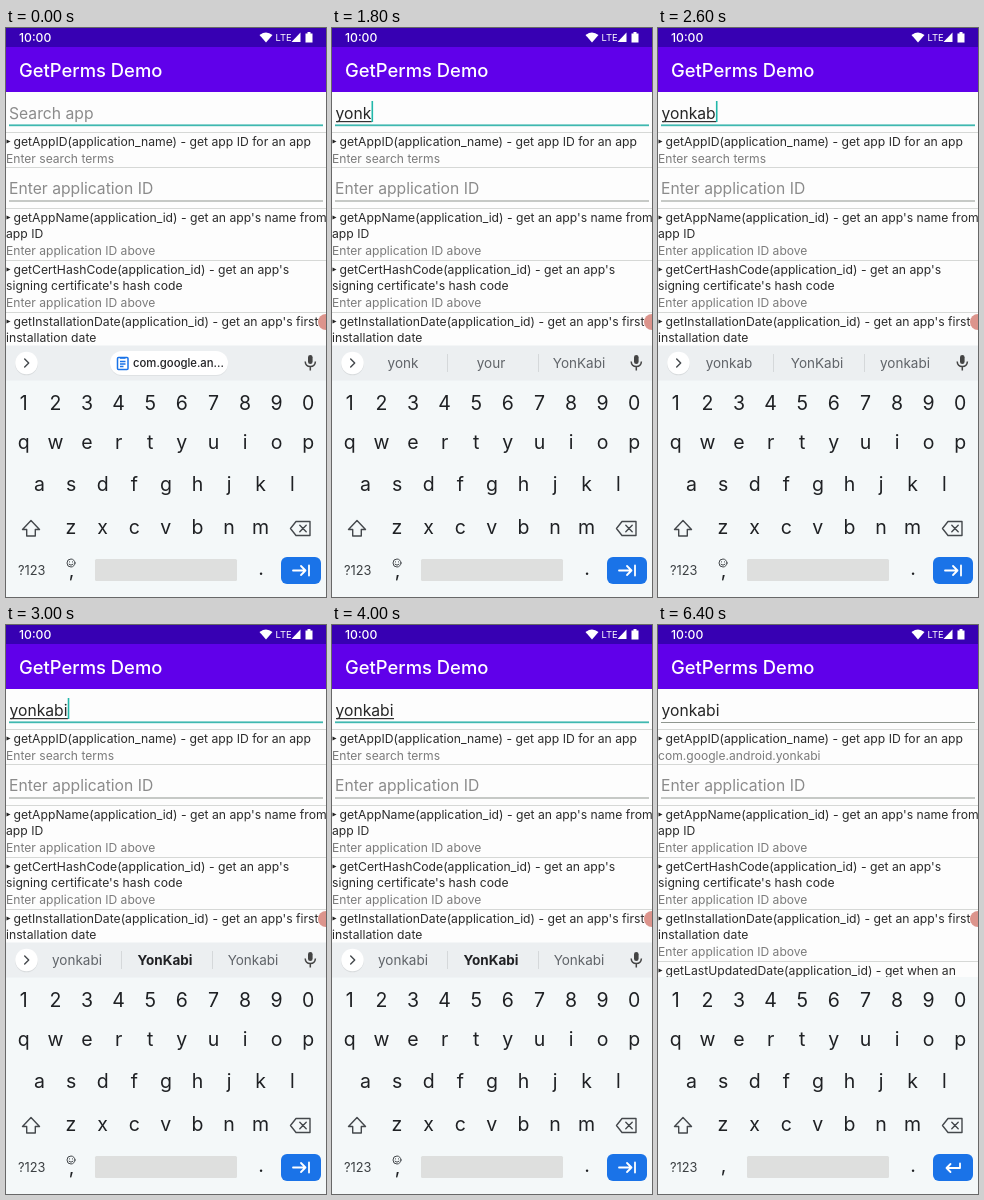
An HTML page that plays this animation: 320x569 px, repeating every 8000 ms.

```html
<!DOCTYPE html>
<html lang="en">
<head>
<meta charset="utf-8">
<title>GetPerms Demo</title>
<style>
  html, body { margin: 0; width: 100%; height: 100%; overflow: hidden; background: #fdfdfd; }
  svg { display: block; width: 320px; height: 569px; }
  text { font-family: Inter, Roboto, sans-serif; white-space: pre; }
  .title { font-size: 12.2px; fill: #2b2b2b; }
  .sub { font-size: 12.1px; fill: #7b7b7b; }
  .field { font-size: 15.7px; fill: #262626; }
  .hint { fill: #8b8b8b; }
  .key { font-size: 19.5px; fill: #1f2124; text-anchor: middle; }
  .word { font-size: 13.5px; fill: #5f6368; text-anchor: middle; }
  .best { font-weight: 700; fill: #202124; }
  .icon { fill: none; stroke: #44484c; stroke-width: 1.4; stroke-linejoin: round; stroke-linecap: round; }
  .white { stroke: #fff; stroke-width: 1.8; }
</style>
</head>
<body>
<svg viewBox="0 0 320 569">
  <rect width="320" height="569" fill="#fdfdfd"/>

  <g id="list"></g>
  <rect id="line" x="3" width="314" fill="#3fb8b0"/>
  <text id="hint" class="field hint" x="3" y="90.5">Search app</text>
  <text id="typed" class="field" x="3.5" y="90.5"></text>
  <rect id="compose" x="4" y="93" height="1.2" fill="#333"/>
  <rect id="caret" y="73" width="1.6" height="21" fill="#22b8aa"/>
  <rect x="3" y="172.5" width="314" height="1" fill="#8f968f"/>
  <text class="field hint" x="3" y="166">Enter application ID</text>
  <circle cx="320" cy="294" r="8" fill="#dc948c"/>

  <rect width="320" height="19.5" fill="#3700b3"/>
  <rect y="19" width="320" height="45" fill="#6000ea"/>
  <text x="13" y="14" font-size="12.2" font-weight="500" fill="#fff">10:00</text>
  <text x="13" y="49" font-size="18.4" font-weight="500" fill="#fff">GetPerms Demo</text>
  <g fill="#fff">
    <path d="M253.5 7Q260 2 266.5 7L260 14.5Z"/>
    <text x="269.5" y="13.2" font-size="9.4">LTE</text>
    <path d="M294.5 4.5V14H285.5Z"/>
    <path d="M299.5 5.5H301.5V4H304.5V5.5H306.5V14.5H299.5Z"/>
  </g>

  <g id="keyboard">
    <rect y="352" width="320" height="217" fill="#f4f8f9"/>
    <g id="keys"></g>
    <path class="icon" d="M25 492.5L33.5 501.5H29.3V508H20.7V501.5H16.5Z"/>
    <path class="icon" d="M284.5 500.5L290 493.5H304V507.5H290ZM293.8 497.3L300.2 503.7M300.2 497.3L293.8 503.7"/>
    <text x="12" y="547" font-size="12.8" fill="#3c4043">?123</text>
    <rect x="89" y="531" width="142" height="22" rx="1.5" fill="#dedfde"/>
    <text id="comma" class="key" x="65.5">,</text>
    <text class="key" x="255" y="547">.</text>
    <g id="smile" class="icon" style="stroke-width:1">
      <circle cx="65" cy="535" r="4"/>
      <path d="M63.5 534V533.8M66.5 534V533.8M63 536.3Q65 538.3 67 536.3"/>
    </g>
    <rect id="enter" x="275" y="529" width="40" height="27" rx="6"/>
    <path id="next" class="icon white" d="M287 542.5H299.5M295 538L299.5 542.5L295 547M303 537.5V547.5"/>
    <path id="back" class="icon white" d="M302 538.5V543H288.5M292.5 539L288.5 543L292.5 547"/>
  </g>

  <g id="strip">
    <rect y="317.5" width="320" height="35" fill="#eceff1"/>
    <circle cx="20.5" cy="335.8" r="11.5" fill="#d9dcde"/>
    <circle cx="20.5" cy="335" r="11.3" fill="#fff"/>
    <path class="icon" d="M18.7 331L22.7 335L18.7 339"/>
    <g fill="#444" stroke="#444">
      <rect x="302" y="327" width="4.6" height="9" rx="2.3" stroke="none"/>
      <path d="M299.2 333.5Q299.5 338.6 304.3 338.6T309.4 333.5M304.3 338.6V342.5" fill="none" stroke-width="1.5"/>
    </g>
    <g id="chip">
      <rect x="104" y="324" width="118" height="24" rx="12" fill="#dfe2e4"/>
      <rect x="104" y="323" width="118" height="24" rx="12" fill="#fff"/>
      <g fill="none" stroke="#1a73e8" stroke-width="1.5">
        <rect x="111.5" y="329.5" width="10.5" height="12" rx="1"/>
        <path d="M114 330H119.5M114 333.5H119.5M114 336H119.5M114 338.5H117.5"/>
      </g>
      <text x="127" y="339" font-size="11.3" font-weight="500" fill="#202124">com.google.an...</text>
    </g>
    <g id="words">
      <path d="M115.5 326V344M206.5 326V344" stroke="#d5d8da"/>
      <text class="word" x="71" y="340"></text>
      <text class="word" x="159" y="340"></text>
      <text class="word" x="247" y="340"></text>
    </g>
  </g>
</svg>
<script>
const LOOP = 8000, CARET_OFF = 3400, PRESS = [3600, 3800], DONE = 6200;

// time, typed text, suggestions
const steps = [
  [0, '', []],
  [600, 'y', ['y', 'you', 'yes']],
  [1000, 'yo', ['yo', 'to', 'you']],
  [1400, 'yon', ['yon', 'you', 'your']],
  [1800, 'yonk', ['yonk', 'your', 'YonKabi']],
  [2200, 'yonka', ['yonka', 'YonKabi', 'yonkabi']],
  [2600, 'yonkab', ['yonkab', 'YonKabi', 'yonkabi']],
  [3000, 'yonkabi', ['yonkabi', 'YonKabi', 'Yonkabi']]
];

const $ = id => document.getElementById(id);
const show = (id, on) => $(id).style.display = on ? '' : 'none';

function add(parent, tag, attrs, text = '') {
  const el = document.createElementNS('http://www.w3.org/2000/svg', tag);
  for (const name in attrs) el.setAttribute(name, attrs[name]);
  el.textContent = text;
  parent.append(el);
  return el;
}

function addEntry(y, lines, sub) {
  const list = $('list');
  add(list, 'rect', { x: 0, y: y - 14, width: 320, height: 1, fill: '#d6d8d6' });
  add(list, 'path', { d: `M0.5 ${y - 6.5}L4.5 ${y - 4.5}L0.5 ${y - 2.5}Z`, fill: '#222' });
  lines.forEach((line, i) =>
    add(list, 'text', { class: 'title', x: i ? 0 : 7.5, y: y + 16 * i }, line));
  return add(list, 'text', { class: 'sub', x: 0, y: y + 16 * lines.length + 1.3 }, sub);
}

const above = 'Enter application ID above';
const result = addEntry(118, ['getAppID(application_name) - get app ID for an app'], '');
add($('list'), 'rect', { x: 0, y: 139, width: 320, height: 1, fill: '#d6d8d6' });
addEntry(194, ["getAppName(application_id) - get an app's name from", 'app ID'], above);
addEntry(246, ["getCertHashCode(application_id) - get an app's", "signing certificate's hash code"], above);
addEntry(298, ["getInstallationDate(application_id) - get an app's first", 'installation date'], above);
addEntry(350, ['getLastUpdatedDate(application_id) - get when an'], '');

const rows = [['1234567890', 17.8, 382.3], ['qwertyuiop', 17.8, 420.5],
              ['asdfghjkl', 33.5, 463], ['zxcvbnm', 65, 506]];
for (const [chars, x, y] of rows)
  [...chars].forEach((c, i) => add($('keys'), 'text', { class: 'key', x: x + 31.6 * i, y }, c));

const words = [...$('words').querySelectorAll('text')];

function draw(t) {
  const [, typed, tips] = steps.filter(s => s[0] <= t).pop();
  const done = t >= DONE;

  $('typed').textContent = typed;
  const width = typed ? $('typed').getComputedTextLength() : 0;
  $('compose').setAttribute('width', width);
  $('caret').setAttribute('x', 3.7 + width);
  show('hint', !typed);
  show('compose', typed && !done);
  show('caret', typed && t < CARET_OFF);
  $('line').setAttribute('y', done ? 97 : 96.4);
  $('line').setAttribute('height', done ? 1 : 1.8);
  $('line').setAttribute('fill', done ? '#8f968f' : '#3fb8b0');
  result.textContent = done ? 'com.google.android.yonkabi' : 'Enter search terms';

  show('strip', !done);
  show('chip', !typed);
  show('words', typed);
  words.forEach((el, i) => el.textContent = tips[i] || '');
  words[1].classList.toggle('best', typed.length === 7);

  show('smile', !done);
  $('comma').setAttribute('y', done ? 547 : 549);
  show('next', !done);
  show('back', done);
  $('enter').setAttribute('fill', t >= PRESS[0] && t < PRESS[1] ? '#1967d2' : '#1a73e8');
}

const start = performance.now();
let last = -1;
function tick() {
  const t = (performance.now() - start) % LOOP;
  const slot = Math.floor(t / 200);
  if (slot !== last) draw(t);
  last = slot;
  requestAnimationFrame(tick);
}
draw(0);
tick();
</script>
</body>
</html>
```
